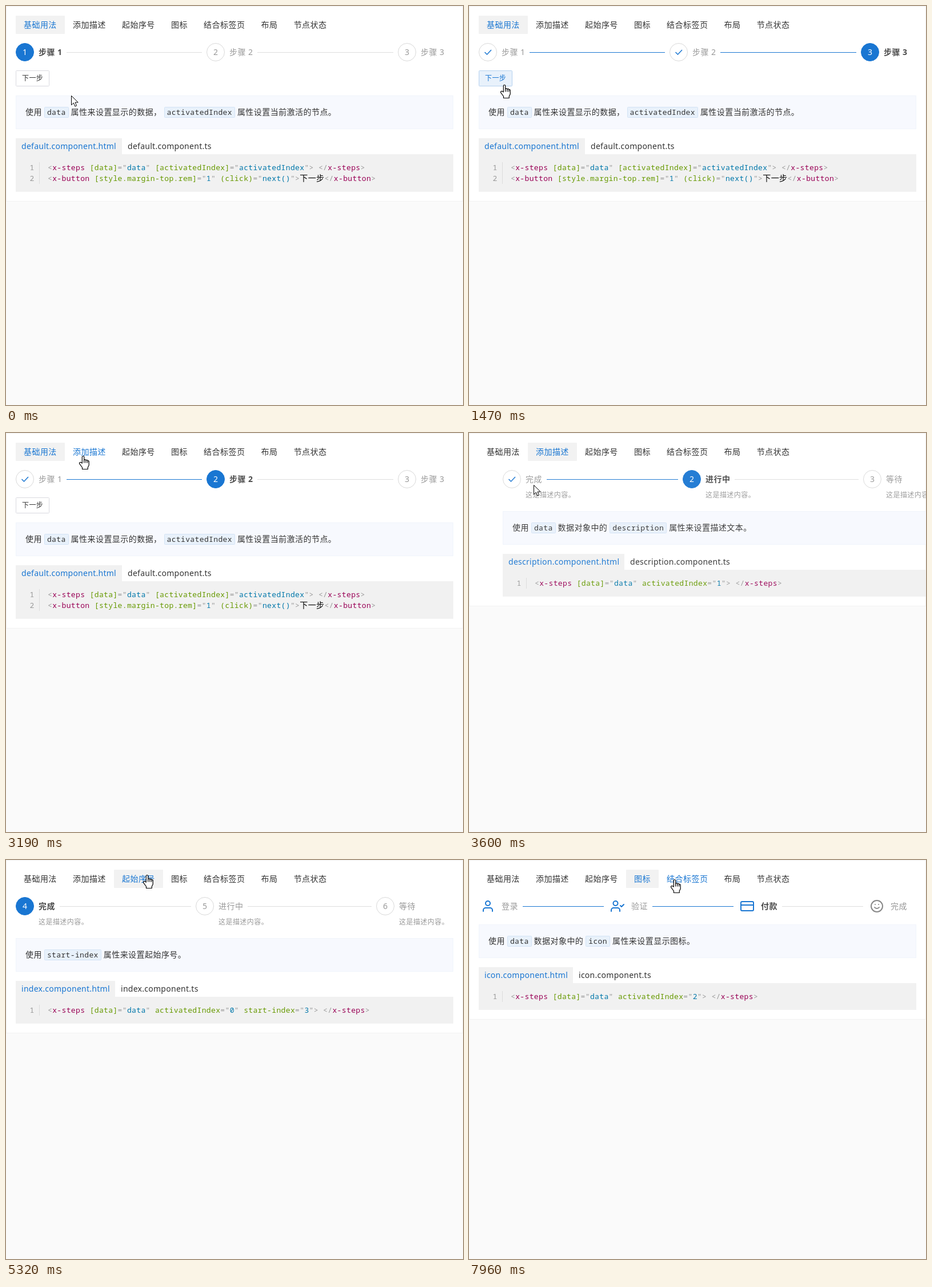
Recreate the animation shown at these times as an HTML page. Size 800 px wide and 700 px high, loop 8000 ms.

```html
<!DOCTYPE html>
<html lang="zh-CN">
<head>
<meta charset="utf-8">
<title>Steps</title>
<style>
html, body { margin: 0; width: 100%; height: 100%; overflow: hidden; background: #fafafa; }
svg { display: block; width: 800px; height: 700px; }
text { font: 14px "Noto Sans", "Noto Sans CJK SC", "Noto Sans CJK JP", sans-serif; white-space: pre; }
.ui { letter-spacing: .45px; }
.bold { letter-spacing: .45px; font-weight: 700; }
.file { letter-spacing: .27px; }
.desc { font-size: 12px; letter-spacing: .45px; }
.btn { font-size: 12px; letter-spacing: .4px; }
.num { text-anchor: middle; }
.mono { font: 13px "Noto Sans Mono", "Noto Sans CJK SC", monospace; letter-spacing: .37px; }
.cjk { font: 400 14px "Noto Sans CJK SC", "Noto Sans CJK JP", sans-serif; letter-spacing: .4px; }
.icon { fill: none; stroke-width: 2; stroke-linecap: round; stroke-linejoin: round; }
</style>
</head>
<body>
<svg viewBox="0 0 800 700">
  <rect id="panel" x=".5" y=".5" width="799" fill="#fff" stroke="#f2f2f2"/>
  <g id="tabs"></g>
  <g id="body"><g id="live"></g><g id="fixed"></g></g>
  <g id="cursor"></g>
</svg>
<script>
const LOOP = 8000, SLIDE = 300, BLUE = '#1976d2', GRAY = '#999', CH = 14.45, MONO = 8.17;
const $ = id => document.getElementById(id);

const text = (x, y, s, cls = 'ui', fill = '#333') =>
  `<text x="${x}" y="${y}" class="${cls}" fill="${fill}">${s}</text>`;
const rect = (x, y, w, h, fill, more = '') =>
  `<rect x="${x}" y="${y}" width="${w}" height="${h}" fill="${fill}" ${more}/>`;

// Colour between two RGB triples
const mix = (a, b, p) => `rgb(${a.map((v, i) => Math.round(v + (b[i] - v) * p))})`;
const RGB = { white: [255, 255, 255], blue: [25, 118, 210], edge: [217, 217, 217] };

// ---- Top tabs ----
let left = 17;
const tabs = ['基础用法', '添加描述', '起始序号', '图标', '结合标签页', '布局', '节点状态'].map(s => {
  const tab = { s, x: left, w: s.length * CH + 28.2 };
  left += tab.w;
  return tab;
});

// ---- Step bars ----
const icons = [
  '<path d="M20 21v-2a4 4 0 0 0-4-4H8a4 4 0 0 0-4 4v2"/><circle cx="12" cy="7" r="4"/>',
  '<path d="M16 21v-2a4 4 0 0 0-4-4H5a4 4 0 0 0-4 4v2M17 11l2 2 4-4"/><circle cx="8.5" cy="7" r="4"/>',
  '<rect x="1" y="4" width="22" height="16" rx="2"/><path d="M1 10h22"/>',
  '<circle cx="12" cy="12" r="10"/><path d="M8 14s1.5 2 4 2 4-2 4-2M9 9h.01M15 9h.01"/>'
];

// state: -1 done, 0 active, 1 waiting
function node(x, i, state, o) {
  if (o.icons) {
    return `<g class="icon" stroke="${state > 0 ? '#888' : BLUE}" transform="translate(${x - 12} 69)">${icons[i]}</g>`;
  }
  const heat = o.heat ? o.heat(i) : +(state === 0);
  const disc = `<circle cx="${x}" cy="81" r="15.5" fill="${mix(RGB.white, RGB.blue, heat)}" stroke="${mix(RGB.edge, RGB.blue, heat)}"/>`;
  const mark = state < 0
    ? `<path d="M${x - 5.5} 81l4 4 7.5-8" fill="none" stroke="${BLUE}" stroke-width="1.5"/>`
    : text(x, 86, i + (o.first || 1), 'num', state ? GRAY : '#fff');
  return disc + mark;
}

const titleWidth = s => [...s].reduce((w, c) => w + (c === ' ' ? 4 : c < '~' ? 8.4 : CH), 0);

function steps(xs, titles, active, o = {}) {
  return xs.map((x, i) => {
    const state = Math.sign(i - active), title = titles[i];
    let out = node(x, i, state, o) +
      text(x + 24, 86, title, state ? 'ui' : 'bold', state ? GRAY : '#4a4a4a');
    if (o.desc) out += text(x + 24, 113, '这是描述内容。', 'desc', GRAY);
    if (i < xs.length - 1) {
      const from = Math.round(x + 32 + titleWidth(title));
      out += rect(from, 81, xs[i + 1] - 24 - from, 1, state < 0 ? BLUE : '#dedede');
    }
    return out;
  }).join('');
}

// ---- Note box: plain runs and code runs take turns ----
function note(y, runs) {
  let x = 34, out = rect(17.5, y + .5, 765, 58, '#f7f9fe', 'stroke="#f0f4fb"');
  runs.forEach((s, i) => {
    if (i % 2) {
      const w = s.length * MONO + 10;
      out += rect(Math.round(x) + .5, y + 20.5, Math.round(w) - 1, 18, '#e8f1fb', 'stroke="#d3e3f5" rx="1"') +
        text(x + 5, y + 34, s, 'mono');
      x += w + 4;
    } else {
      out += text(x, y + 34, s);
      x += s.length * CH + 4;
    }
  });
  return out;
}

// ---- Code viewer ----
const TOKEN = /(<\/?)([\w-]+)|([[(][\w.-]+[\])]|[\w-]+)(=")([^"]+)(")|(>)|(\s+)|([\u4e00-\u9fff]+)/g;
const PAINT = [GRAY, '#905', '#690', GRAY, '#07a', GRAY, GRAY, GRAY, '#000'];

const span = (s, i) =>
  s ? `<tspan class="${i === 8 ? 'cjk' : ''}" fill="${PAINT[i]}">${s.replace('<', '&lt;')}</tspan>` : '';
const highlight = line => [...line.matchAll(TOKEN)].map(m => m.slice(1).map(span).join('')).join('');

function code(y, name, tabWidth, lines) {
  const h = 19 * lines.length;
  return rect(17, y - 28, tabWidth, 28, '#f1f1f1') +
    text(27, y - 9, name + '.component.html', 'file', BLUE) +
    text(27 + tabWidth, y - 9, name + '.component.ts', 'file') +
    rect(17, y, 766, h + 28, '#f1f1f1') +
    rect(58, y + 14, 1, h, '#dcdcdc') +
    lines.map((s, i) => text(41.5, y + 28 + 19 * i, i + 1, 'mono', GRAY) +
      text(73, y + 28 + 19 * i, highlight(s), 'mono')).join('');
}

// ---- Pages ----
const three = [33, 348, 664], stages = ['完成', '进行中', '等待'];
const pages = [
  { from: 0, height: 342, html: note(157, ['使用', 'data', '属性来设置显示的数据，', 'activatedIndex', '属性设置当前激活的节点。']) +
    code(260, 'default', 186, [
      '<x-steps [data]="data" [activatedIndex]="activatedIndex"> </x-steps>',
      '<x-button [style.margin-top.rem]="1" (click)="next()">下一步</x-button>']) },
  { from: 3371, height: 303, html: steps(three, stages, 1, { desc: true }) +
    note(137, ['使用', 'data', '数据对象中的', 'description', '属性来设置描述文本。']) +
    code(240, 'description', 213, ['<x-steps [data]="data" activatedIndex="1"> </x-steps>']) },
  { from: 5015, height: 303, html: steps(three, stages, 0, { desc: true, first: 4 }) +
    note(137, ['使用', 'start-index', '属性来设置起始序号。']) +
    code(240, 'index', 174, ['<x-steps [data]="data" activatedIndex="0" start-index="3"> </x-steps>']) },
  { from: 6815, height: 279, html: steps([33, 260, 487, 714], ['登录', '验证', '付款', '完成'], 2, { icons: true }) +
    note(113, ['使用', 'data', '数据对象中的', 'icon', '属性来设置显示图标。']) +
    code(216, 'icon', 165, ['<x-steps [data]="data" activatedIndex="2"> </x-steps>']) }
];

// ---- Pointer: [time, x, y] of its tip ----
const path = [
  [0, 114, 157], [70, 114, 157], [600, 62, 138], [2860, 62, 138], [3250, 140, 34], [3369, 137, 36],
  [3600, 113, 91], [3720, 106, 104], [3950, 85, 137], [4200, 130, 112], [4540, 212, 52], [4880, 247, 26],
  [5640, 247, 26], [6100, 307, 32], [7430, 307, 32], [7950, 360, 34]
];
const ARROW = '<path d="M.5.5v16.2l3.8-3.6 2.6 6 2.7-1.2-2.6-5.8h5.2z" fill="#fff" stroke="#000"/>';
const HAND = `<g stroke="#000" stroke-width="1.2" stroke-linejoin="round">
  <path fill="#fff" d="M-1.7 13V2.2a1.7 1.7 0 0 1 3.4 0V8a1.6 1.6 0 0 1 3.2.4 1.5 1.5 0 0 1 2.9.8
    1.4 1.4 0 0 1 2.4 1.3V16.500L8.200 20.500V23.500H-1.500V20.500L-6.200 14.200C-7.500 12-5 10.500-3.500 11.800Z"/>
  <path fill="none" d="M1.7 8v4.500M4.900 8.500v4M7.800 9.500v3"/></g>`;

function pointer(t) {
  const i = path.findIndex(k => k[0] > t);
  if (i < 0) return path[path.length - 1].slice(1);
  const [a, b] = [path[i - 1], path[i]];
  const u = (t - a[0]) / (b[0] - a[0]), e = u * u * (3 - 2 * u);
  return [a[1] + (b[1] - a[1]) * e, a[2] + (b[2] - a[2]) * e];
}

// ---- First page: [click time, active step] ----
const clicks = [[-1000, 0], [720, 1], [1165, 2], [2025, 0], [2415, 1]];

function basic(t, hover) {
  const n = clicks.filter(c => c[0] <= t).length - 1;
  const [at, active] = clicks[n], before = n ? clicks[n - 1][1] : active;
  const p = 1 - (1 - Math.min(1, (t - at) / 300)) ** 2.5;
  const heat = i => i === active ? (before === active ? 1 : p) : i === before ? 1 - p : 0;
  return steps([33, 367, 702], ['步骤 1', '步骤 2', '步骤 3'], active, { heat }) +
    rect(17.5, 113.5, 58, 27, hover ? '#e8f1fb' : '#fff', `stroke="${hover ? '#b5d1ef' : '#d9d9e0'}" rx="1"`) +
    text(28, 131, '下一步', 'btn', hover ? BLUE : '#333');
}

const last = {};
function put(id, html) {
  if (last[id] !== html) $(id).innerHTML = last[id] = html;
}

function draw(t) {
  const n = pages.filter(p => p.from <= t).length - 1, page = pages[n];
  const [x, y] = pointer(t);
  const over = tabs.findIndex(b => y >= 17 && y < 49 && x >= b.x && x < b.x + b.w);
  const onButton = n === 0 && x > 17 && x < 76 && y > 113 && y < 141;

  $('panel').setAttribute('height', page.height);
  put('tabs', tabs.map((b, i) => (i === n ? rect(Math.round(b.x), 17, Math.round(b.w), 32, '#f2f2f2', 'rx="1"') : '') +
    text(b.x + 14, 38, b.s, 'ui', i === n || i === over ? BLUE : '#333')).join(''));
  put('live', n ? '' : basic(t, onButton));
  put('fixed', page.html);

  // A new page fades in from the right
  const rest = n ? (1 - Math.min(1, (t - page.from) / SLIDE)) ** 2 : 0;
  $('body').setAttribute('transform', `translate(${Math.round(766 * rest)} 0)`);
  $('body').setAttribute('opacity', 1 - rest);

  put('cursor', over >= 0 || onButton ? HAND : ARROW);
  $('cursor').setAttribute('transform', `translate(${Math.round(x)} ${Math.round(y)})`);
}

const start = performance.now();
function tick() {
  draw((performance.now() - start) % LOOP);
  requestAnimationFrame(tick);
}
tick();
</script>
</body>
</html>
```
